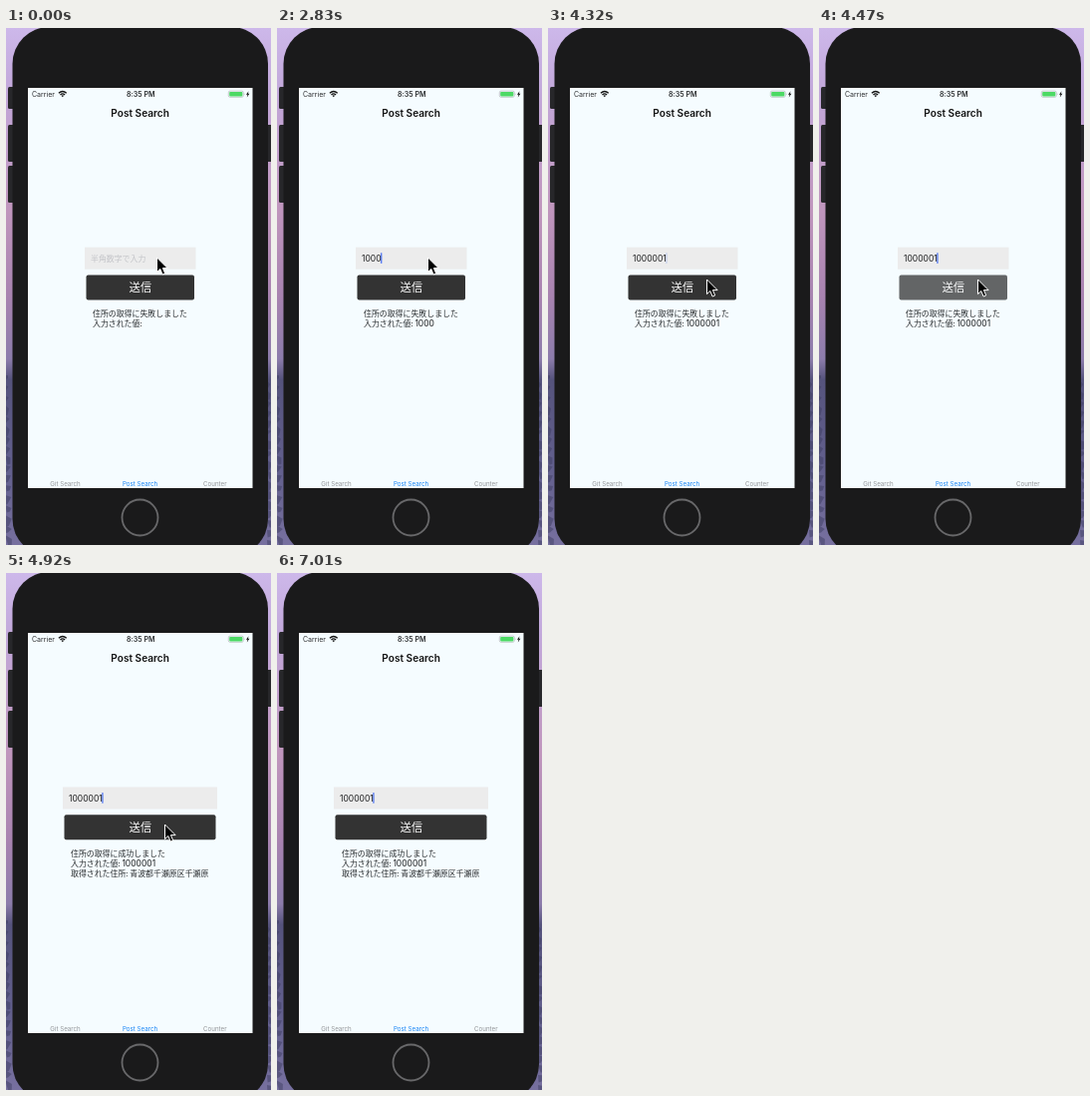
These frames come from a looping animation (266 px wide and 518 px high, 7.31 s). An HTML page:

```html
<!DOCTYPE html>
<html lang="ja">
<head>
<meta charset="utf-8">
<title>Post Search</title>
<style>
html, body { margin: 0; width: 100%; height: 100%; overflow: hidden; background: #1a1a1b; }
svg { display: block; width: 266px; height: 518px; }
text { font-family: 'Noto Sans CJK JP', 'Noto Sans CJK', sans-serif; font-size: 7.92px; fill: #2b2d2f; white-space: pre; }
.latin { font-family: Inter, sans-serif; }
.num { font-family: Inter, sans-serif; font-size: 8.5px; fill: #1c1d1e; }
.mid { text-anchor: middle; }
.tab { font-size: 6.2px; fill: #929497; }
.on { fill: #1583f5; }
#hint { fill: #c3c4c8; }
#label { font-size: 11.4px; font-weight: 500; fill: #fff; }
</style>
</head>
<body>
<svg viewBox="0 0 266 518">
  <defs>
    <linearGradient id="sky" x1="0" y1="0" x2="0" y2="1">
      <stop offset="0" stop-color="#cdb8ea"/>
      <stop offset=".12" stop-color="#c2a8da"/>
      <stop offset=".35" stop-color="#c096bd"/>
      <stop offset=".52" stop-color="#a883b0"/>
      <stop offset=".64" stop-color="#8c7cab"/>
      <stop offset=".68" stop-color="#55537c"/>
      <stop offset=".85" stop-color="#625f8d"/>
      <stop offset="1" stop-color="#77709f"/>
    </linearGradient>
  </defs>
  <rect width="266" height="518" fill="url(#sky)"/>
  <g id="rocks" fill="#3e3e62" opacity=".5"></g>

  <g fill="#27272a">
    <rect x="2" y="59" width="8" height="22" rx="1.5"/>
    <rect x="2" y="97" width="8" height="37" rx="1.5"/>
    <rect x="2" y="138" width="8" height="37" rx="1.5"/>
    <rect x="259" y="97" width="8" height="37" rx="1.5"/>
  </g>
  <rect x="6.5" y="-1" width="256.5" height="530" rx="37" fill="#1a1a1b"/>
  <circle cx="134.5" cy="490.5" r="18" fill="#1a1a1b" stroke="#68686a" stroke-width="1.8"/>
  <rect x="22" y="60" width="225.5" height="401" fill="#f5fcff"/>

  <g fill="#111">
    <text class="latin" x="26" y="68.6" style="font-size:7px">Carrier</text>
    <g fill="none" stroke="#111" stroke-width="1.3">
      <path d="M52.9 65.2q3.9-3.5 7.8 0M54.5 66.9q2.3-2 4.6 0"/>
    </g>
    <path d="M55.5 67.8q1.3-1 2.6 0l-1.3 1.4z"/>
    <text class="latin mid" x="135.3" y="68.6" style="font-size:7.1px;font-weight:600">8:35 PM</text>
    <rect x="223.3" y="63.1" width="15" height="6.2" rx="1.6" fill="none" stroke="#a5abad" stroke-width=".6"/>
    <rect x="224.2" y="64" width="13.2" height="4.4" rx=".8" fill="#4cd964"/>
    <path d="M239 65.2q1 1 0 2z" fill="#a5abad"/>
    <path d="M243.5 63.2l-2.5 3.5h1.5l-.7 2.7 2.6-3.6h-1.5z"/>
  </g>
  <text class="latin mid" x="134.6" y="88.8" style="font-size:10.1px;font-weight:600;fill:#111">Post Search</text>
  <text class="latin mid tab" x="59.5" y="458.7">Git Search</text>
  <text class="latin mid tab on" x="134.5" y="458.7">Post Search</text>
  <text class="latin mid tab" x="209.8" y="458.7">Counter</text>

  <rect id="field" height="22" fill="#ececec"/>
  <text id="hint">半角数字で入力</text>
  <text id="typed" class="num"></text>
  <rect id="caret" width="1.2" height="10.6" fill="#426bf2"/>
  <g id="button">
    <rect id="plate" height="25" rx="2" fill="#333"/>
    <text id="label" class="mid" x="134.8">送信</text>
  </g>
  <g id="lines">
    <text id="status"></text>
    <text id="echo">入力された値: <tspan id="value" class="num"></tspan></text>
    <text id="place">取得された住所: 青波都千瀬原区千瀬原</text>
  </g>
  <g id="spinner" stroke="#2a2ae8" stroke-linecap="round"></g>
  <path id="cursor" d="M0 0V14.6L3.3 11.5 5.6 17 8.2 15.9 5.9 10.6H10.6Z" fill="#000" stroke="#fff" stroke-width="1" stroke-linejoin="round"/>
</svg>
<script>
const LOOP = 7310;
const $ = id => document.getElementById(id);
const el = new Proxy({}, { get: (_, id) => $(id) });

function add(parent, tag, attrs) {
  const node = document.createElementNS('http://www.w3.org/2000/svg', tag);
  set(node, attrs);
  parent.append(node);
  return node;
}
function set(node, attrs) {
  for (const key in attrs) node.setAttribute(key, attrs[key]);
}

// Stepped tracks: [start time, value]
const digits = [[0, 0], [1350, 1], [1940, 2], [2240, 3], [2830, 4], [2980, 5], [3430, 6], [3720, 7]];
const caret = [[0, 0], [750, 1], [4020, .8], [4170, 0], [4320, .25], [4470, 1], [4770, .75],
  [4920, 1], [5520, 0], [6110, 1], [6560, .3], [6710, 0], [7010, 1]];
const press = [[0, 1], [4470, .75], [4620, .85], [4770, .94], [4920, 1]];
const pointer = [[0, [151.5, 230]], [4020, [153, 235]], [4170, [157, 246]], [4320, [159.5, 252]],
  [5520, [159, 247]], [5670, [157, 240]], [5820, [155.3, 234.5]], [5970, [154.6, 232]],
  [6110, [154.2, 231]], [6410, [152, 300]], [6560, [150, 463]], [6710, null]];
const form = { x: 79, y: 219.7, w: 111.5 };
const busy = { x: 112, y: 232, w: 46 };
const done = { x: 57, y: 214.5, w: 155 };
const layout = [[0, form], [4620, busy], [4920, done]];

const at = (track, t) => track.reduce((v, [start, next]) => t >= start ? next : v, null);

const spokes = Array.from({ length: 12 }, (_, i) =>
  add(el.spinner, 'path', { d: 'M0-3.2V-5.6', transform: `translate(135 292) rotate(${i * 30})` }));

// Rough dark patches on the lower wallpaper
for (let i = 0; i < 34; i++) {
  const y = 348 + i * 5, x = i % 2 ? 262 : -1;
  const r = n => Math.abs(Math.sin(i * n) * 4);
  add(el.rocks, 'path', { d: `M${x} ${y}l${3 + r(3.1)} ${r(7.7)} ${-r(5.3)} ${3 + r(2.3)}-3 1z` });
}

function draw(t) {
  const box = at(layout, t), { x, y, w } = box;
  const text = '1000001'.slice(0, at(digits, t));
  const waiting = box === busy, found = box === done;

  set(el.field, { x, y, width: w });
  set(el.hint, { x: x + 6, y: y + 14, visibility: text ? 'hidden' : 'visible' });
  set(el.typed, { x: x + 6, y: y + 14.2 });
  el.typed.textContent = el.value.textContent = text;
  const end = text ? el.typed.getComputedTextLength() : 0;
  set(el.caret, { x: x + 6 + end - .4, y: y + 5.6, opacity: at(caret, t) });

  set(el.button, { opacity: at(press, t) });
  set(el.plate, { x: x + 1.5, y: y + 27.7, width: w - 3 });
  set(el.label, { y: y + 44.2 });

  set(el.lines, { visibility: waiting ? 'hidden' : 'visible' });
  el.status.textContent = `住所の取得に${found ? '成功' : '失敗'}しました`;
  [el.status, el.echo, el.place].forEach((line, i) => set(line, { x: x + 8, y: y + 69.7 + i * 9.9 }));
  set(el.place, { opacity: found ? 1 : 0 });

  set(el.spinner, { visibility: waiting ? 'visible' : 'hidden' });
  const head = t >= 4770 ? 10 : 8;
  spokes.forEach((s, i) => set(s, { opacity: 1 - (head - i + 12) % 12 * .07 }));

  const tip = at(pointer, t);
  set(el.cursor, tip ? { transform: `translate(${tip})`, visibility: 'visible' } : { visibility: 'hidden' });
}

const begin = performance.now();
function tick() {
  draw((performance.now() - begin) % LOOP);
  requestAnimationFrame(tick);
}
tick();
</script>
</body>
</html>
```
